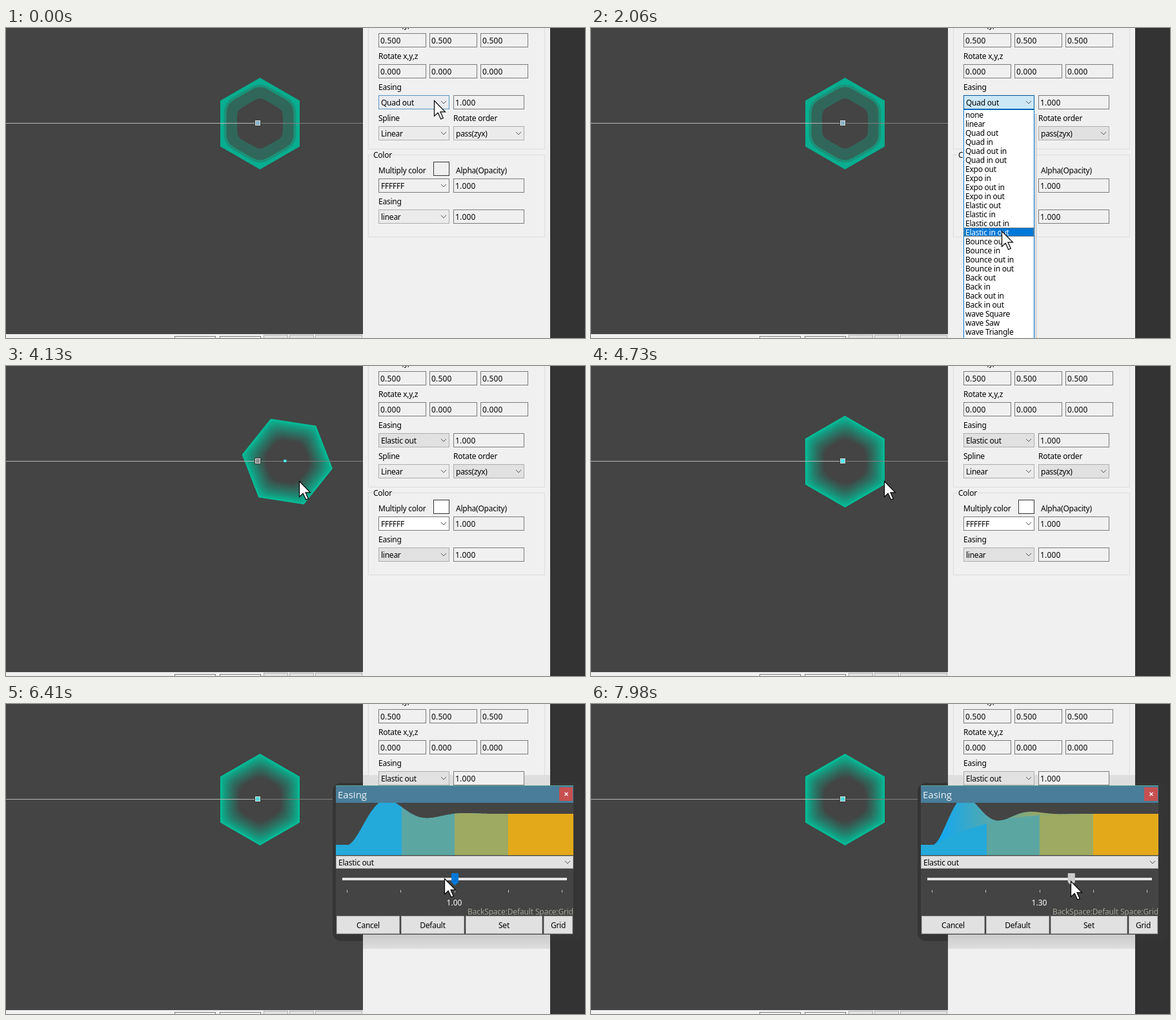
Write an HTML page with a canvas that moves like this. It is 897x480 px and loops after 8 s.

```html
<!DOCTYPE html>
<html lang="en">
<head>
<meta charset="utf-8">
<title>Easing editor</title>
<style>
html, body { margin: 0; width: 100%; height: 100%; overflow: hidden; background: #434443; }
canvas { display: block; }
</style>
</head>
<body>
<canvas id="stage" width="897" height="480"></canvas>
<script>
const g = document.getElementById('stage').getContext('2d');
const LOOP = 8000, STEP = 74;
const BG = '#434443', PANEL = '#f0f0f0', LIT = '#e1e1e1', SOFT = '#ebebeb', BLUE = '#0078d7';
const T = { open: 240, pick: 2730, unfocus: 3760, play: 4050, dialog: 5980, press: 6650, drag: 6710, zero: 7540 };
const TRAVEL = 393, SPIN = 2 * Math.PI, PLAY_MS = 780;

const EASES = ['none', 'linear'];
for (const kind of ['Quad', 'Expo', 'Elastic', 'Bounce', 'Back'])
  for (const way of ['out', 'in', 'out in', 'in out']) EASES.push(kind + ' ' + way);
EASES.push('wave Square', 'wave Saw', 'wave Triangle');

const ROW = 14, LIST_TOP = 127;
const rowY = name => LIST_TOP + ROW * (EASES.indexOf(name) + 0.5);
const knobX = v => 693.5 + 166 * (v - 1);
const knobValue = x => Math.max(0, 1 + (x - 693.5) / 166);

// pointer stops: time, x, y
const STOPS = [
  [0, 663, 112],
  [300, 663, 112],
  [880, 640, rowY('Expo out')],
  [1760, 632, rowY('Bounce out')],
  [2600, 645, rowY('Elastic out')],
  [3080, 679, 278],
  [3600, 454, 178],
  [5030, 454, 178],
  [5830, 748, 100],
  [6340, 679, 270],
  [T.drag, knobX(1), 271],
  [6935, knobX(1.25), 272],
  [7310, knobX(0), 273],
  [T.zero, knobX(0), 273],
  [7970, knobX(1.3), 274]
];

const smooth = k => k * k * (3 - 2 * k);
const mix = (a, b, k) => a + (b - a) * k;

function pointerAt(t) {
  const i = STOPS.findIndex(p => p[0] > t);
  if (i < 0) return STOPS[STOPS.length - 1].slice(1);
  const [a, x, y] = STOPS[i - 1], [b, x2, y2] = STOPS[i];
  const k = smooth((t - a) / (b - a));
  return [mix(x, x2, k), mix(y, y2, k)];
}

// the edited easing: a swing that dies out at t = 1
function elastic(t, power = 1) {
  return t >= 1 ? 1 : 1 - Math.pow(1 - t, 3) * Math.cos(4 * Math.PI * Math.pow(power, 0.8) * t);
}

function rect(x, y, w, h, fill) {
  g.fillStyle = fill;
  g.fillRect(x, y, w, h);
}

function box(x, y, w, h, fill, edge) {
  rect(x, y, w, h, edge);
  rect(x + 1, y + 1, w - 2, h - 2, fill);
}

function text(s, x, y, { color = '#000', size = 12, gap = -0.25, align = 'left', face = 'Noto Sans' } = {}) {
  g.font = `${size}px "${face}", sans-serif`;
  g.letterSpacing = gap + 'px';
  g.textAlign = align;
  g.fillStyle = color;
  g.fillText(s, x, y + 4.5);
}

function line(pts, color, width = 1) {
  g.beginPath();
  pts.forEach(([x, y]) => g.lineTo(x, y));
  g.strokeStyle = color;
  g.lineWidth = width;
  g.stroke();
}

function field(s, x, y, w = 110) {
  box(x, y, w, 22, PANEL, '#7a7a7a');
  text(s, x + 3, y + 11, { gap: 0.2 });
}

function select(s, x, y, fill = SOFT, edge = '#adadad', w = 110, h = 22) {
  box(x, y, w, h, fill, edge);
  const cx = x + w - 9, cy = y + h / 2;
  text(s, x + 4, cy + 0.5);
  line([[cx - 4, cy - 2], [cx, cy + 2], [cx + 4, cy - 2]], '#555');
}

function dotted(x, y, w, h, color) {
  g.setLineDash([1, 1]);
  g.strokeStyle = color;
  g.lineWidth = 1;
  g.strokeRect(x + 0.5, y + 0.5, w - 1, h - 1);
  g.setLineDash([]);
}

// hexagon with given half width, corners rounded by q
function hex(half, q, color) {
  const r = (half - q) / 0.866;
  g.beginPath();
  for (let i = 0; i < 6; i++) g.lineTo(r * Math.sin(i * Math.PI / 3), -r * Math.cos(i * Math.PI / 3));
  g.closePath();
  g.fillStyle = g.strokeStyle = color;
  g.fill();
  if (!q) return;
  g.lineJoin = 'round';
  g.lineWidth = 2 * q;
  g.stroke();
  g.lineJoin = 'miter';
}

function glow(layers = 36) {
  const rim = [0, 196, 157], core = [67, 68, 67];
  for (let i = 0; i <= layers; i++) {
    const u = i / layers, k = Math.pow(u, 0.74);
    hex(61.5 - 30 * u, 21 * Math.min(1, u * 5), `rgb(${rim.map((c, j) => Math.round(mix(c, core[j], k)))})`);
  }
}

function bands() {
  hex(61.5, 0, '#07ae8f');
  hex(56, 28, '#1a9279');
  hex(52, 24, '#31675b');
  hex(35.5, 16, BG);
}

function drawShape(t) {
  const played = t >= T.play, moving = played && t < T.play + 10 * STEP;
  const off = moving ? elastic((t - T.play + 34) / PLAY_MS) - 1 : 0;
  const dx = off * TRAVEL;
  g.save();
  g.translate(393.5 + dx, 148);
  g.rotate(off * SPIN);
  played ? glow() : bands();
  g.restore();
  rect(0, 147, 390, 1, '#b8bab8');
  rect(390, 147, 163, 1, '#808180');
  box(385, 142, 10, 10, '#d8dcdc', '#3a3a3a');
  rect(387, 144, 6, 6, Math.abs(dx) > 4 ? '#8e8e8e' : played ? '#4fd9dc' : '#86b4c8');
  if (moving) rect(388 + dx, 145, 4, 4, '#4ff0f4');
}

function group(y, h, label) {
  g.strokeStyle = '#dcdcdc';
  g.lineWidth = 1;
  g.strokeRect(561.5, y + 0.5, 273, h);
  if (!label) return;
  rect(567, y - 2, 31, 5, PANEL);
  text(label, 569, y);
}

function shade(y, h, from, to) {
  const fill = g.createLinearGradient(0, y, 0, y + h);
  fill.addColorStop(0, from);
  fill.addColorStop(1, to);
  rect(553, y, 290, h, fill);
}

function drawPanel(t, py) {
  const picked = t >= T.pick, open = t >= T.open && !picked;
  rect(553, 0, 290, 480, PANEL);
  rect(843, 0, 54, 480, '#333');
  group(-60, 247);
  group(196, 127, 'Color');
  if (t >= T.dialog) {
    shade(110, 16, '#dedede', '#dedede');
    shade(357, 22, '#cbcbcb', '#dedede');
  }
  ['Scale x,y,z', 'Rotate x,y,z', 'Easing', 'Spline'].forEach((s, i) => text(s, 577, 48 * i - 5));
  text('Rotate order', 693, 139);
  text('Multiply color', 577, 220);
  text('Alpha(Opacity)', 697, 220);
  text('Easing', 577, 268);
  for (let i = 0; i < 3; i++) {
    field('0.500', 577 + 79 * i, 8, 74);
    field('0.000', 577 + 79 * i, 56, 74);
  }

  if (picked) select('Elastic out', 577, 104, LIT);
  else if (open) select('Quad out', 577, 104, '#cce8f7', '#005499');
  else select('Quad out', 577, 104, '#e9ebee', '#5a96c4');
  if (picked && t < T.unfocus) dotted(580, 107, 87, 16, '#000');
  select('Linear', 577, 152);
  select('pass(zyx)', 693, 152, t >= T.open ? LIT : SOFT);
  const paper = picked ? '#fff' : PANEL;
  box(662, 207, 25, 22, paper, '#333');
  select('FFFFFF', 577, 233, paper, '#7a7a7a');
  const over = picked && t < T.unfocus && py > 276;
  select('linear', 577, 281, over ? '#e0e5ec' : picked ? LIT : SOFT, over ? '#6a9cc8' : '#adadad');
  for (const y of [104, 233, 281]) field('1.000', 693, y);
}

function drawList(py) {
  rect(687, 133, 4, 347, '#d8d8d8');
  box(577, 126, 110, 360, '#fff', BLUE);
  const hot = py < LIST_TOP ? EASES.indexOf('Quad out') : Math.floor((py - LIST_TOP) / ROW);
  EASES.forEach((name, i) => {
    const y = LIST_TOP + i * ROW;
    if (i === hot) {
      rect(578, y, 108, ROW, BLUE);
      dotted(578, y, 108, ROW, '#ff8728');
    }
    text(name, 580, y + 7.5, { color: i === hot ? '#fff' : '#000' });
  });
}

function curve(power) {
  g.beginPath();
  g.moveTo(511, 234);
  g.lineTo(511, 218);
  for (let x = 531; x <= 879; x += 2) g.lineTo(x, 218 - 48 * elastic((x - 531) / 260, power));
  g.lineTo(879, 234);
  g.closePath();
}

function drawGraph(t, power) {
  g.save();
  g.beginPath();
  g.rect(511, 153, 368, 81);
  g.clip();
  curve(power);
  g.clip();
  const fade = g.createLinearGradient(531, 0, 778, 0);
  fade.addColorStop(0, '#0aa8fa');
  fade.addColorStop(1, '#dfa91c');
  rect(511, 153, 368, 81, fade);
  curve(t >= T.zero ? 0 : 1);
  g.clip();
  ['#24a9db', '#5ca6a2', '#9eaa61', '#e3a91a'].forEach((c, i) => {
    const x = i ? Math.round(530 + 82.7 * i) : 511;
    rect(x, 153, 879 - x, 81, c);
  });
  g.restore();
}

function drawFrame() {
  g.save();
  g.beginPath();
  g.rect(505, 120, 48, 250);
  g.rect(843, 120, 54, 250);
  g.clip();
  g.fillStyle = '#353535';
  g.beginPath();
  g.roundRect(506, 122, 388, 245, 13);
  g.fill();
  g.restore();
}

function drawDialog(t, px) {
  const knob = t >= T.drag ? px + 1 : 695.5;
  const value = t >= T.drag ? knobValue(px) : 1;
  drawFrame();
  rect(511, 126, 368, 231, BG);
  rect(511, 126, 368, 27, '#497d99');
  rect(511, 126, 368, 1, '#58a596');
  text('Easing', 514, 141, { color: '#eef3f5', size: 15, gap: 0, face: 'Open Sans' });
  rect(857, 129, 21, 21, '#c75050');
  line([[865.5, 137], [870.5, 142]], '#fff', 1.3);
  line([[870.5, 137], [865.5, 142]], '#fff', 1.3);

  drawGraph(t, value);
  select('Elastic out', 511, 235, LIT, '#adadad', 368, 20);

  rect(521, 269, 348, 4, '#e4e4e4');
  for (let i = 0; i < 5; i++) rect(Math.round(528 + i * 83.25), 288, 1, 4, '#c4c4c4');
  g.fillStyle = t >= T.press ? '#ccc' : BLUE;
  g.beginPath();
  for (const [x, y] of [[-5.5, 262], [5.5, 262], [5.5, 276], [0, 281], [-5.5, 276]]) g.lineTo(knob + x, y);
  g.fill();
  text(value.toFixed(2), 694.5, 307, { color: '#fff', align: 'center', gap: 0 });
  text('BackSpace:Default Space:Grid', 879, 321, { color: '#a3a399', align: 'right', gap: -0.15 });

  let x = 512;
  for (const [name, w] of [['Cancel', 98], ['Default', 98], ['Set', 119], ['Grid', 45]]) {
    box(x, 328, w, 28, LIT, '#adadad');
    text(name, x + w / 2, 342.5, { align: 'center' });
    x += w + 2;
  }
}

function drawPointer(x, y) {
  const arrow = [[0, 0], [0, 16], [3.8, 12.5], [6.8, 19], [9.2, 18], [6.3, 11.6], [11.3, 11.6]];
  g.beginPath();
  arrow.forEach(([a, b]) => g.lineTo(Math.round(x) + 0.5 + a * 1.5, Math.round(y) + 0.5 + b * 1.5));
  g.closePath();
  g.fillStyle = '#fff';
  g.fill();
  g.strokeStyle = '#000';
  g.lineWidth = 1.2;
  g.stroke();
}

function drawBar() {
  rect(0, 474, 553, 6, PANEL);
  for (const x of [261, 331]) box(x, 477, 64, 9, PANEL, '#7a7a7a');
  for (const x of [399, 439, 479]) box(x, 475, x < 479 ? 38 : 73, 9, LIT, '#adadad');
}

// the screen refreshes in steps, aligned with the start of playback
function refresh(t) {
  return Math.max(0, T.play + STEP * Math.floor((t - T.play) / STEP));
}

function draw(now) {
  const t = refresh(now % LOOP);
  const [px, py] = pointerAt(t);
  rect(0, 0, 897, 480, BG);
  drawShape(t);
  drawBar();
  drawPanel(t, py);
  if (t >= T.open && t < T.pick) drawList(py);
  if (t >= T.dialog) drawDialog(t, px);
  drawPointer(px, py);
}

const start = performance.now();
function tick() {
  draw(performance.now() - start);
  requestAnimationFrame(tick);
}
tick();
</script>
</body>
</html>
```
